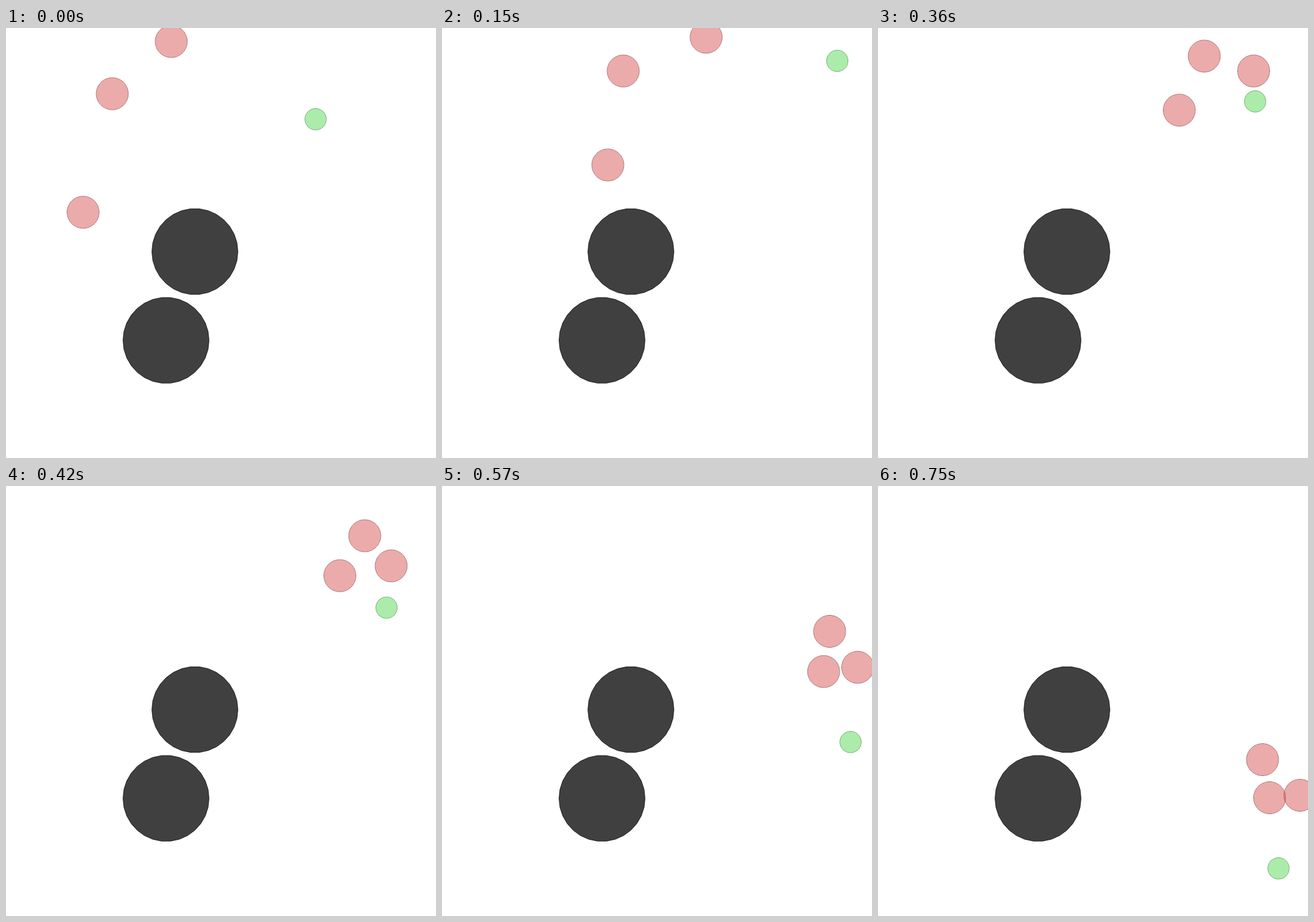
Write an HTML page that moves like this. It is 700 px wide and 700 px high and loops after 780 ms.

```html
<!DOCTYPE html>
<html lang="en">
<head>
<meta charset="utf-8">
<title>Pursuit</title>
<style>
  html, body { margin: 0; width: 100%; height: 100%; overflow: hidden; background: #fff; }
  svg { display: block; }
  .fill { shape-rendering: crispEdges; }
  .edge { fill: none; stroke-width: 1; }
</style>
</head>
<body>
<svg id="stage" width="700" height="700" viewBox="0 0 700 700"></svg>
<script>
const STEP_MS = 30, STEPS = 26;
const UNIT = 350; // pixels per world unit
const RED = [217, 89, 89], GREEN = [89, 217, 89], GREY = [64, 64, 64];
const stage = document.getElementById('stage');

function add(parent, tag, attributes = {}) {
  const node = document.createElementNS('http://www.w3.org/2000/svg', tag);
  for (const name in attributes) node.setAttribute(name, attributes[name]);
  return parent.appendChild(node);
}

function disc(size, color, opacity) {
  const sides = 30, radius = size * UNIT;
  const points = Array.from({ length: sides }, (_, i) => {
    const angle = 2 * Math.PI * i / sides;
    return [radius * Math.cos(angle), radius * Math.sin(angle)];
  }).join(' ');
  const group = add(stage, 'g', { opacity: 1 });
  add(group, 'polygon', { class: 'fill', points, fill: `rgb(${color})`, 'fill-opacity': opacity });
  add(group, 'polygon', {
    class: 'edge', points, stroke: `rgb(${color.map(c => c / 2)})`, 'stroke-opacity': opacity
  });
  return group;
}

function place(group, x, y) {
  group.setAttribute('transform', `translate(${x} ${y})`);
}

// Smooth curve through the knots: sets off at half pace and ends unbent.
function spline(times, values) {
  const last = times.length - 1;
  const spans = times.slice(1).map((t, i) => t - times[i]);
  const rates = spans.map((span, i) => (values[i + 1] - values[i]) / span);
  const slopes = [rates[0] / 2, ...rates];
  for (let pass = 0; pass < 40; pass++) {
    for (let i = 1; i < last; i++) {
      const a = 1 / spans[i - 1], b = 1 / spans[i];
      slopes[i] = (3 * (a * rates[i - 1] + b * rates[i]) - a * slopes[i - 1] - b * slopes[i + 1])
        / (2 * (a + b));
    }
    slopes[last] = (3 * rates[last - 1] - slopes[last - 1]) / 2;
  }
  return time => {
    let i = 0;
    while (i < last - 1 && time >= times[i + 1]) i++;
    const u = (time - times[i]) / spans[i], w = 1 - u;
    return values[i] * (1 + 2 * u) * w * w + values[i + 1] * u * u * (3 - 2 * u)
      + spans[i] * u * w * (slopes[i] * w - slopes[i + 1] * u);
  };
}

function mover(size, color, times, path) {
  const group = disc(size, color, 0.5);
  const [x, y] = [0, 1].map(axis => spline(times, path.map(point => point[axis])));
  return step => place(group, x(step), y(step));
}

const chaser = path => mover(0.075, RED, [0, 5, 9, 14, 17, 21, 25], path);
const runner = path => mover(0.05, GREEN, [0, 5, 7, 9, 14, 17, 21, 25], path);

const movers = [
  chaser([[125.5, 300], [270, 223], [398, 165.5], [543.5, 146], [599, 235], [633.5, 368], [637.5, 507.5]]),
  chaser([[173, 107], [295, 70], [429.5, 33], [584, 81], [624, 169], [630.5, 306], [626, 445.5]]),
  chaser([[269, 22], [430, 15], [570, 12], [627, 130], [660.5, 228], [685, 363.5], [687, 503.5]]),
  runner([[504, 148.5], [643.5, 53.5], [682, 27], [654.5, 38], [619.5, 198], [665.5, 326], [650.5, 500.5], [652, 622.5]])
];

place(disc(0.2, GREY, 1), 307.5, 364);
place(disc(0.2, GREY, 1), 260.5, 508.5);

const start = performance.now();
function tick() {
  const step = Math.floor((performance.now() - start) / STEP_MS) % STEPS;
  movers.forEach(move => move(step));
  requestAnimationFrame(tick);
}
tick();
</script>
</body>
</html>
```
